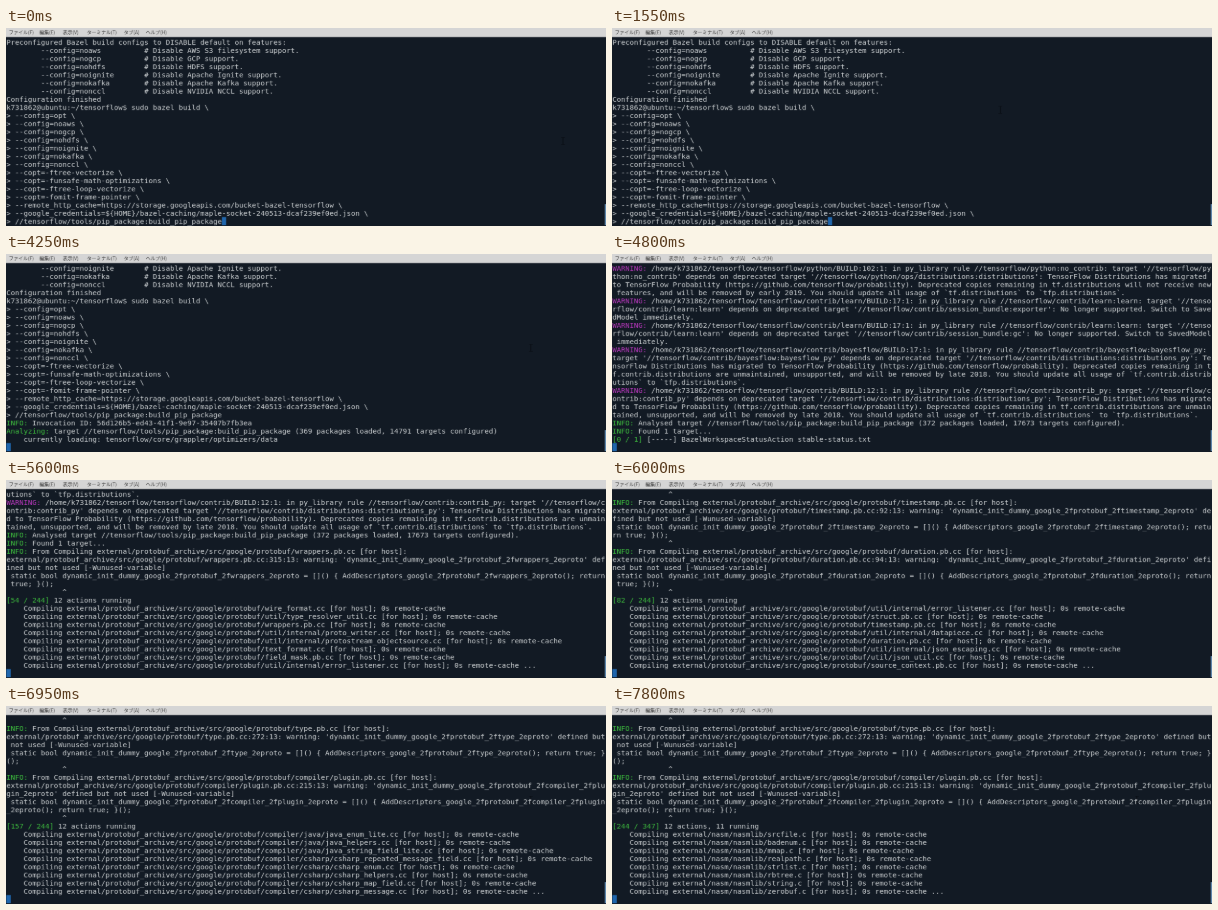
Write an HTML page with a canvas that moves like this. It is 600 px wide and 198 px high and loops after 8000 ms.

```html
<!DOCTYPE html>
<html lang="ja">
<head>
<meta charset="utf-8">
<style>
  html, body { margin: 0; width: 100%; height: 100%; overflow: hidden; background: #121a24; }
  canvas { display: block; }
</style>
</head>
<body>
<canvas id="screen" width="600" height="198"></canvas>
<script>
const LOOP = 8000, COLS = 139, ROWS = 23;
const WIDTH = 1253, HEIGHT = 414, CELL = 9, LINE = 17, TOP = 21, LEFT = 1; // terminal's own pixels
const SCALE = 600 / WIDTH;

// The terminal is drawn at full size, then shrunk smoothly onto the stage.
const stage = document.getElementById('screen').getContext('2d');
const terminal = Object.assign(document.createElement('canvas'), { width: WIDTH, height: HEIGHT });
const ctx = terminal.getContext('2d');
stage.imageSmoothingQuality = 'high';

const TARGET = '//tensorflow/tools/pip_package:build_pip_package';
const PROTO = 'external/protobuf_archive/src/google/protobuf/';
const features = {
  aws: 'AWS S3 filesystem', gcp: 'GCP', hdfs: 'HDFS',
  ignite: 'Apache Ignite', kafka: 'Apache Kafka', nccl: 'NVIDIA NCCL',
};
const names = Object.keys(features);

const prompt = [
  'Preconfigured Bazel build configs to DISABLE default on features:',
  ...names.map(n => `        --config=no${n}`.padEnd(32) + `# Disable ${features[n]} support.`),
  'Configuration finished',
  'k731862@ubuntu:~/tensorflow$ sudo bazel build \\',
  '> --config=opt \\',
  ...names.map(n => `> --config=no${n} \\`),
  ...['ftree-vectorize', 'funsafe-math-optimizations', 'ftree-loop-vectorize', 'fomit-frame-pointer']
    .map(flag => `> --copt=-${flag} \\`),
  '> --remote_http_cache=https://storage.googleapis.com/bucket-bazel-tensorflow \\',
  '> --google_credentials=${HOME}/bazel-caching/maple-socket-240513-dcaf239ef0ed.json \\',
  '> ' + TARGET,
];

const deprecated = (build, rule, dependency, reason) =>
  [`WARNING: /home/k731862/tensorflow/tensorflow/${build}: in py_library rule //tensorflow/${rule}: ` +
   `target '//tensorflow/${rule}' depends on deprecated target '//tensorflow/${dependency}': ${reason}`];

const migrated = (module, fate) =>
  'TensorFlow Distributions has migrated to TensorFlow Probability ' +
  `(https://github.com/tensorflow/probability). Deprecated copies remaining in ${module} ${fate}. ` +
  `You should update all usage of \`${module}\` to \`tfp.distributions\`.`;

const contribMoved = migrated('tf.contrib.distributions',
  'are unmaintained, unsupported, and will be removed by late 2018');
const savedModel = 'No longer supported. Switch to SavedModel immediately.';

const unused = (file, line) => {
  const symbol = 'google_2fprotobuf_2f' + file.replace(/_/g, '_5f').replace(/\//g, '_2f') + '_2eproto';
  const path = `${PROTO}${file}.pb.cc`;
  return [
    `INFO: From Compiling ${path} [for host]:`,
    `${path}:${line}:13: warning: 'dynamic_init_dummy_${symbol}' defined but not used [-Wunused-variable]`,
    ` static bool dynamic_init_dummy_${symbol} = []() { AddDescriptors_${symbol}(); return true; }();`,
    ' '.repeat(13) + '^',
  ];
};

const log = [
  prompt,
  ['INFO: Invocation ID: 56d126b5-ed43-41f1-9e97-35407b7fb3ea'],
  deprecated('python/BUILD:102:1', 'python:no_contrib', 'python/ops/distributions:distributions',
    migrated('tf.distributions', 'will not receive new features, and will be removed by early 2019')),
  deprecated('contrib/learn/BUILD:17:1', 'contrib/learn:learn', 'contrib/session_bundle:exporter', savedModel),
  deprecated('contrib/learn/BUILD:17:1', 'contrib/learn:learn', 'contrib/session_bundle:gc', savedModel),
  deprecated('contrib/bayesflow/BUILD:17:1', 'contrib/bayesflow:bayesflow_py',
    'contrib/distributions:distributions_py', contribMoved),
  deprecated('contrib/BUILD:12:1', 'contrib:contrib_py', 'contrib/distributions:distributions_py', contribMoved),
  [`INFO: Analysed target ${TARGET} (372 packages loaded, 17673 targets configured).`],
  ['INFO: Found 1 target...'],
  unused('wrappers', 315), unused('struct', 341), unused('timestamp', 92), unused('duration', 94),
  unused('source_context', 94), unused('type', 272), unused('compiler/plugin', 215),
];

// Files in compile order; each build status shows eight in a row.
const list = (prefix, words, suffix) => words.split(' ').map(w => prefix + w + suffix);
const JAVA = PROTO + 'compiler/java/java_', NASM = 'external/nasm/';
const files = [
  ...list(PROTO, 'arena arenastring extension_set io/zero_copy_stream message_lite stubs/bytestream ' +
    'stubs/common generated_message_table_driven_lite stubs/strutil descriptor dynamic_message reflection_ops ' +
    'wire_format util/type_resolver_util wrappers.pb util/internal/proto_writer ' +
    'util/internal/protostream_objectsource text_format field_mask.pb util/internal/error_listener ' +
    'struct.pb timestamp.pb util/internal/datapiece duration.pb util/internal/json_escaping ' +
    'util/json_util source_context.pb util/internal/utility ' +
    'util/internal/protostream_objectwriter type.pb compiler/java/java_message_builder ' +
    'util/field_comparator util/message_differencer compiler/java/java_message_builder_lite ' +
    'util/time_util compiler/java/java_enum_field', '.cc'),
  ...list(JAVA, 'context doc_comment extension field file enum_lite helpers string_field_lite', '.cc'),
  ...list(PROTO + 'compiler/', 'csharp/csharp_repeated_message_field csharp/csharp_enum csharp/csharp_helpers ' +
    'csharp/csharp_map_field csharp/csharp_message objectivec/objectivec_enum objectivec/objectivec_file ' +
    'js/js_generator main plugin zip_writer subprocess', '.cc'),
  ...list(NASM, 'asm/error asm/labels common/common stdlib/snprintf', '.c'),
  ...list(NASM + 'nasmlib/', 'crc64 file filename ilog path raa saa readnum ' +
    'srcfile badenum mmap realpath strlist rbtree string zerobuf', '.c'),
];

const analyzing = (packages, targets, loading) => [
  `Analyzing: target ${TARGET} (${packages} packages loaded, ${targets} targets configured)`,
  ...(loading ? ['    currently loading: ' + loading] : []),
];
const building = (done, total, first) => [
  `[${done} / ${total}] 12 actions${total > 244 ? ', 11' : ''} running`,
  ...files.slice(first, first + 8).map((file, i) =>
    `    Compiling ${file} [for host]; 0s remote-cache${i === 7 ? ' ...' : ''}`),
];

// [start time, log entries printed, live status below them]
const steps = [
  [0, 1, null],
  [2650, 2, ['Loading:']],
  [2750, 2, ['Loading: 0 packages loaded']],
  [2800, 2, ['Loading: 1 packages loaded']],
  [2850, 2, analyzing(1, 0)],
  [3050, 2, analyzing(64, 21, 'tensorflow/contrib')],
  [3150, 2, analyzing(257, 1480, 'tensorflow/contrib/lite')],
  [3250, 2, analyzing(338, 3126, 'tensorflow/contrib/lite/tools')],
  [3450, 2, analyzing(356, 6842, 'tensorflow/contrib/lite/tools/benchmark')],
  [3750, 2, analyzing(362, 10275, 'tensorflow/contrib/lite/kernels')],
  [4000, 2, analyzing(367, 12630, 'third_party/fft2d')],
  [4250, 2, analyzing(369, 14791, 'tensorflow/core/grappler/optimizers/data')],
  [4550, 3, analyzing(372, 16208)],
  [4600, 5, analyzing(372, 16954)],
  [4650, 6, analyzing(372, 17420)],
  [4700, 7, analyzing(372, 17673)],
  [4800, 9, ['[0 / 1] [-----] BazelWorkspaceStatusAction stable-status.txt']],
  [5150, 9, building(16, 244, 0)],
  [5400, 9, building(37, 244, 4)],
  [5600, 10, building(54, 244, 12)],
  [5650, 11, building(59, 244, 13)],
  [5750, 12, building(66, 244, 15)],
  [6000, 13, building(82, 244, 19)],
  [6050, 13, building(86, 244, 20)],
  [6200, 14, building(95, 244, 22)],
  [6250, 14, building(99, 244, 23)],
  [6350, 15, building(109, 244, 28)],
  [6550, 15, building(120, 244, 30)],
  [6600, 15, building(124, 244, 32)],
  [6750, 15, building(138, 244, 36)],
  [6950, 16, building(157, 244, 41)],
  [7150, 16, building(183, 244, 44)],
  [7400, 16, building(212, 244, 52)],
  [7600, 16, building(231, 347, 60)],
  [7800, 16, building(244, 347, 68)],
];

const wrap = line => line.match(new RegExp(`.{1,${COLS}}`, 'g')) || [''];
const rowsOf = ([, count, status]) =>
  [...log.slice(0, count).flat(), ...(status ? [...status, ''] : [])].flatMap(wrap).slice(-ROWS);

const menu = [[6, 'ファイル(F)'], [70, '編集(E)'], [119, '表示(V)'],
              [169, 'ターミナル(T)'], [246, 'タブ(A)'], [292, 'ヘルプ(H)']];

// Mouse path: time, x, y on the stage
const path = [[150, 555, 109], [550, 382, 78], [1500, 382, 78], [1600, 391, 78], [1750, 391, 78], [2000, 523, 90]];

function pointerAt(time) {
  const t = Math.floor(time / 50) * 50;
  const next = path.findIndex(p => p[0] > t);
  if (next < 1) return path[next ? path.length - 1 : 0].slice(1);
  const [a, b] = [path[next - 1], path[next]];
  const k = (t - a[0]) / (b[0] - a[0]);
  return [a[1] + (b[1] - a[1]) * k, a[2] + (b[2] - a[2]) * k];
}

function rect(color, x, y, w, h) {
  ctx.fillStyle = color;
  ctx.fillRect(x, y, w, h);
}

function drawPointer(time) {
  const [x, y] = pointerAt(time).map(v => Math.round(v / SCALE));
  rect('#0a0f16', x + 3, y, 2, 16);
  rect('#0a0f16', x, y, 8, 1);
  rect('#0a0f16', x, y + 15, 8, 1);
}

function drawRow(text, row) {
  const y = TOP + row * LINE + 14;
  const tag = (text.match(/^(INFO:|WARNING:|Loading:|Analyzing:|\[\d+ \/ \d+\])/) || [''])[0];
  ctx.fillStyle = tag === 'WARNING:' ? '#c23ac6' : '#3fc23f';
  ctx.fillText(tag, LEFT, y);
  ctx.fillStyle = '#d0d4d6';
  ctx.fillText(text.slice(tag.length), LEFT + tag.length * CELL, y);
}

function draw(now) {
  const time = now % LOOP;
  const rows = rowsOf(steps.filter(s => s[0] <= time).pop());
  rect('#121a24', 0, 0, WIDTH, HEIGHT);
  rect('#d5d5d5', 0, 0, WIDTH, 19);
  ctx.fillStyle = '#333';
  ctx.font = '10px "Noto Sans CJK JP", "Noto Sans CJK", sans-serif';
  for (const [x, label] of menu) ctx.fillText(label, x, 13);

  drawPointer(time);
  rect('#5f87ab', WIDTH - 3, 368, 3, 44);
  const last = rows.length - 1;
  rect('#1f66ad', LEFT + rows[last].length * CELL, TOP + last * LINE, CELL, LINE);
  ctx.font = '14.95px "DejaVu Sans Mono", monospace';
  rows.forEach(drawRow);

  stage.drawImage(terminal, 0, 0, WIDTH * SCALE, HEIGHT * SCALE);
  requestAnimationFrame(draw);
}
requestAnimationFrame(draw);
</script>
</body>
</html>
```
